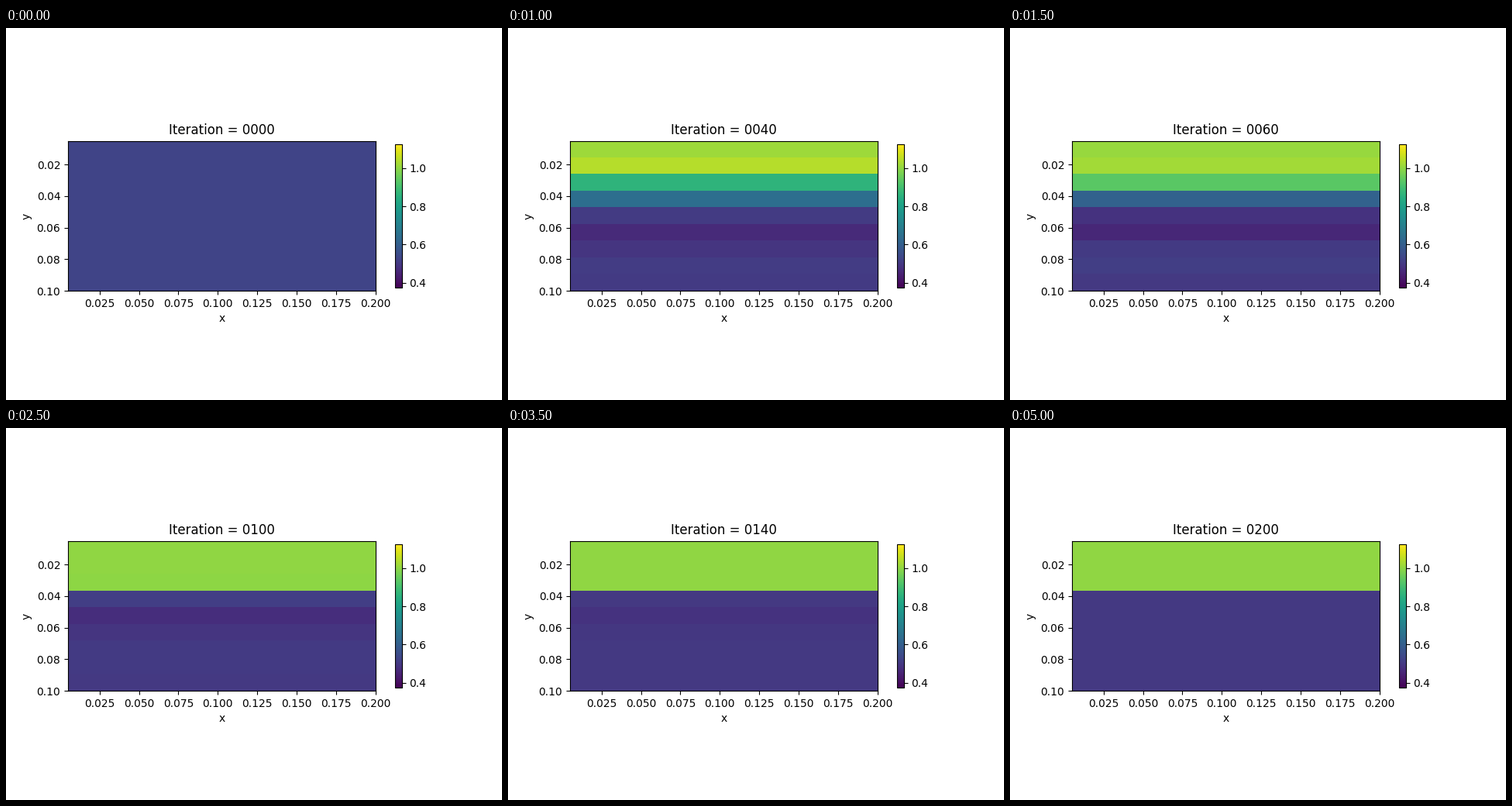
A matplotlib script for the animation above (5500 ms loop, 640 by 480 pixels).

```python
import numpy as np
import matplotlib.pyplot as plt
from matplotlib.animation import FuncAnimation

STEP, FRAMES = 20, 11
ROWS, COLS, EDGE = 9, 19, 3
UPPER, LOWER, START = 1.0, 0.5, 0.53
LEFT, RIGHT, TOP, BOTTOM = 0.005, 0.2, 0.005, 0.1


def settle(t, half, power):
    """Fall from 1 to 0, passing one half at t = half."""
    return 1 / (1 + (t / half) ** power)


def ripple(distance, decay, freq):
    return np.exp(-decay * distance) * np.cos(freq * distance)


def bump(x, center, width):
    return np.exp(-((x - center) / width) ** 2)


def layers(t):
    if t == 0:
        return np.full(ROWS, START)
    above = np.arange(EDGE)[::-1]
    below = np.arange(ROWS - EDGE)
    # Both sides ring away from the interface until the step is sharp
    upper = UPPER - 0.143 * settle(t, 59, 8) * ripple(above, 0.6, 2.15)
    decay = 0.4 + 0.42 * settle(t, 50, 4)
    freq = 1.7 * (1 - settle(t, 24, 3))
    lower = LOWER + 0.153 * settle(t, 71, 6) * ripple(below, decay, freq)
    # A slow trough lingers just under the interface
    lower -= 0.026 * bump(t, 100, 50) * bump(below, 1, 0.7)
    return np.concatenate([upper, lower])


def field(t):
    return np.tile(layers(t)[:, None], (1, COLS))


fig, ax = plt.subplots(figsize=(6.4, 4.8), dpi=100)
image = ax.imshow(field(0), cmap="viridis", vmin=0.375, vmax=1.125,
                  extent=(LEFT, RIGHT, BOTTOM, TOP), interpolation="nearest")
fig.colorbar(image, ax=ax, shrink=0.5)
ax.set_xlabel("x")
ax.set_ylabel("y")
title = ax.set_title("Iteration = 0000")


def update(frame):
    iteration = frame * STEP
    image.set_data(field(iteration))
    title.set_text(f"Iteration = {iteration:04d}")
    return image, title


anim = FuncAnimation(fig, update, frames=FRAMES, interval=500,
                     repeat=True, repeat_delay=0, blit=False)
plt.show()
```
